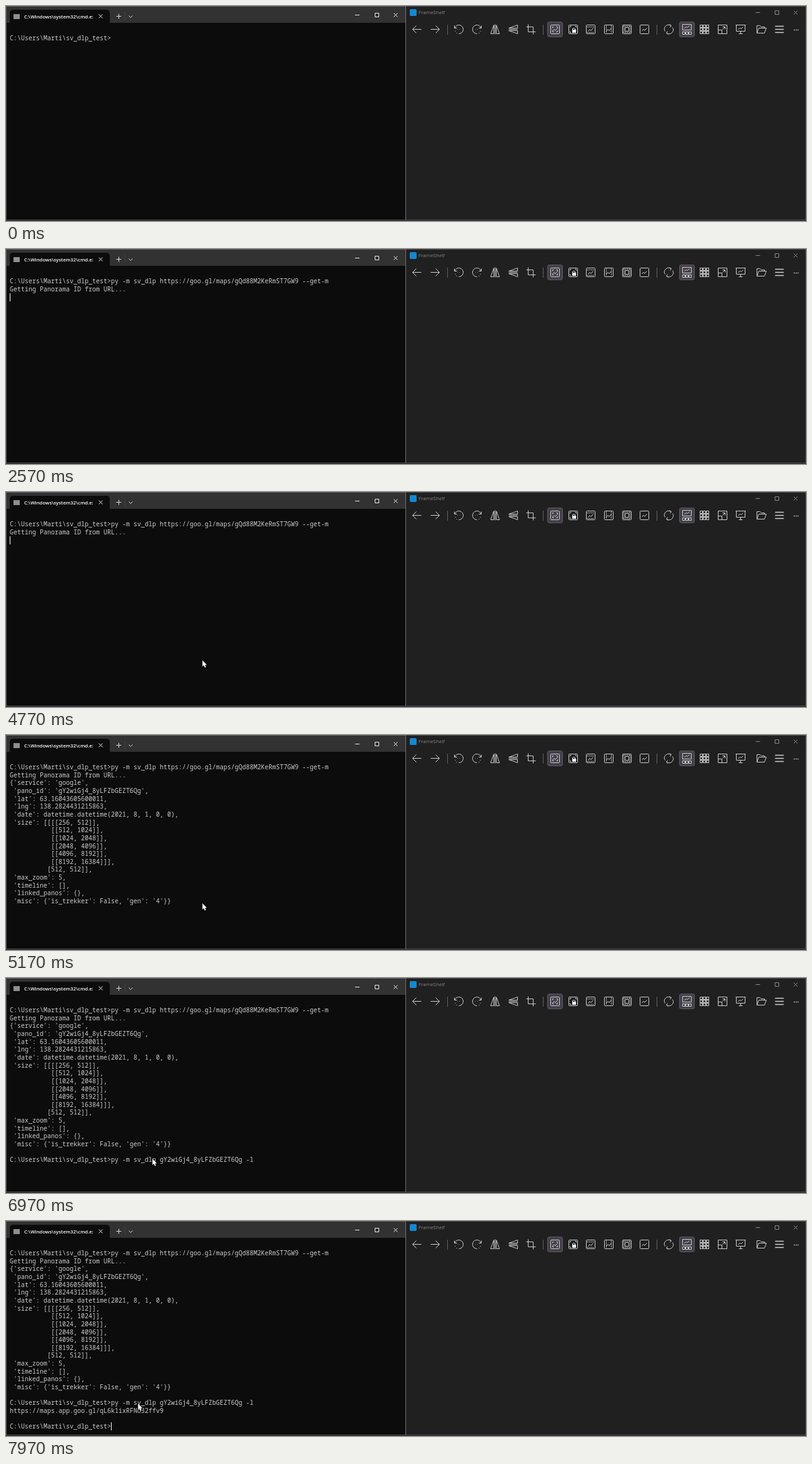
Write an HTML page with a canvas that moves like this. It is 1280 px wide and 345 px high and loops after 8000 ms.

```html
<!DOCTYPE html>
<html lang="en">
<head>
<meta charset="utf-8">
<title>Terminal and viewer</title>
<style>
html, body { margin: 0; width: 1280px; height: 345px; overflow: hidden; background: #0c0c0c; }
canvas { display: block; }
</style>
</head>
<body>
<canvas id="stage" width="1280" height="345"></canvas>
<script>
const LOOP = 8000;
const ctx = document.getElementById('stage').getContext('2d');
const UI = '"Open Sans", "Noto Sans", sans-serif';
const MONO = '500 10px "Noto Sans Mono", "DejaVu Sans Mono", monospace';

function rect(x, y, w, h, color) {
  ctx.fillStyle = color;
  ctx.fillRect(x, y, w, h);
}

function rounded(x, y, w, h, r, color) {
  ctx.fillStyle = color;
  ctx.beginPath();
  ctx.roundRect(x, y, w, h, r);
  ctx.fill();
}

function text(s, x, y, font, color) {
  ctx.font = font;
  ctx.fillStyle = color;
  ctx.fillText(s, x, y);
}

// Strokes a path given relative to the centre (x, y).
function icon(x, y, d, color = '#d8d8d8', width = 1) {
  ctx.save();
  ctx.translate(x + .5, y + .5);
  ctx.strokeStyle = color;
  ctx.lineWidth = width;
  ctx.lineJoin = 'round';
  ctx.stroke(new Path2D(d));
  ctx.restore();
}

const box = (x, y, w, h) => `M${x} ${y}h${w}v${h}h${-w}z`;
const CROSS = 'M-3 -3L3 3M3 -3L-3 3';
const MINUS = 'M-4 0H3';
const SQUARE = box(-3, -3, 6, 6);
const FRAME = 'M-6 -7H6Q7 -7 7 -6V6Q7 7 6 7H-6Q-7 7 -7 6V-6Q-7 -7 -6 -7z';
const CHART = 'M-4 3L-1.5 0L.5 2L4 -2';
const DASH_H = y => `M-6 ${y}h2m1 0h2m1 0h2m1 0h2`;
const DASH_V = x => `M${x} -6v2m0 1v2m0 1v2m0 1v2`;

const grid = rows => rows.map(y => [-7, -2, 3].map(x => box(x, y, 4, 4)).join('')).join('');

const tools = [
  [657, 'M7 0H-7M-1 -6L-7 0L-1 6'],
  [686, 'M-7 0H7M1 -6L7 0L1 6'],
  [724, 'M-7 -6V-2H-3M-6.5 -2.5A7 7 0 1 1 0 7M-2 0h.5M1 0h.5M-4 6h1M-6 3h1'],
  [753, 'M7 -6V-2H3M6.5 -2.5A7 7 0 1 0 0 7M1 0h.5M-2 0h.5M3 6h1M5 3h1'],
  [782, 'M-2 -7V7H-7zM2 -7V7H7zM0 -8V8'],
  [811, 'M7 -7V-2H-7zM-7 2H7V7zM-7 0H7'],
  [839, 'M-4 -8V4H8M-7 -4H4V8'],
  [878, FRAME + CHART + 'M-4 -2V-4H-2M2 -4H4V-2M-4 2V4H-2M2 4H4V2'],
  [907, FRAME + 'M-5 -3V-5H-3M3 -5H5V-3M-5 3V5H-3'],
  [935, FRAME + CHART + DASH_H(-4) + DASH_H(5)],
  [964, FRAME + CHART + DASH_V(-4) + DASH_V(4)],
  [993, FRAME + DASH_H(-5) + DASH_H(5) + DASH_V(-5) + DASH_V(5) + box(-3, -3, 6, 6)],
  [1021, FRAME + 'M-4 2L-1.5 0L.5 1.5L4 -2'],
  [1060, 'M-6 3A6.5 6.5 0 0 1 3 -6M6 -3A6.5 6.5 0 0 1 -3 6M1 -8L4 -6L2 -3M-1 8L-4 6L-2 3'],
  [1089, box(-7, -8, 14, 9) + 'M-4 -2L-1 -4L1 -3L4 -6' + grid([4])],
  [1117, grid([-7, -2, 3])],
  [1146, box(-7, -7, 14, 14) + 'M-7 1H-1V7M0 0L4 -4M0 -4H4V0'],
  [1175, 'M-8 -7H8M-7 -7V3H7V-7M0 3V7M-3 7H3M-4 0L-1 -2L1 -1L4 -4'],
  [1208, 'M-7 6V-6H-2L0 -4H5V-2M-7 6L-4 -2H8L5 6z'],
  [1237, 'M-7 -5H7M-7 0H7M-7 5H7', 1.3],
  [1264, 'M-4 1h1.5M-1 1h1.5M2 1h1.5', 1.3]
];

const controls = (xs, y, color) =>
  [MINUS, SQUARE, CROSS].forEach((d, i) => icon(xs[i], y, d, color));

function terminalWindow() {
  rect(0, 0, 640, 345, '#0c0c0c');
  rect(0, 0, 640, 27, '#323232');
  rounded(6, 6, 160, 22, [5, 5, 0, 0], '#0c0c0c');
  rect(12, 13, 10, 8, '#8f8f8f');
  ctx.save();
  ctx.beginPath();
  ctx.rect(28, 8, 111, 18);
  ctx.clip();
  text('C:\\Windows\\system32\\cmd.exe', 29, 20, '600 7.8px ' + UI, '#fff');
  ctx.restore();
  icon(151, 16, CROSS, '#eee');
  icon(180, 16, 'M-4 0H4M0 -4V4', '#ddd');
  rect(190, 9, 1, 14, '#404040');
  icon(199, 16, 'M-3 -1L0 2L3 -1', '#ddd');
  controls([562, 593, 623], 14, '#f0f0f0');
  rect(0, 0, 640, 1, '#666');
  rect(0, 0, 1, 344, '#555');
  rect(0, 343, 640, 1, '#666');
}

function viewerWindow() {
  rect(640, 0, 640, 345, '#202020');
  rect(640, 0, 640, 1, '#505050');
  rounded(646, 5, 11, 11, 2, '#1687d0');
  text('FrameShelf', 660, 13, '8px ' + UI, '#858585');
  controls([1203, 1233, 1263], 10, '#8c8c8c');
  for (const x of [866, 1077]) {
    rounded(x, 25, 25, 25, 4, '#5d5763');
    rounded(x + 1, 26, 23, 23, 3, '#454049');
  }
  for (const x of [706, 859, 1041]) rect(x, 30, 1, 16, '#626262');
  for (const [x, d, width] of tools) icon(x, 37, d, '#d0d0d0', width);
  rect(906, 38, 6, 5, '#eee');
  icon(908, 37, 'M-2 1V-1Q0 -3 2 -1V1', '#eee');
  rect(639, 0, 1, 344, '#737373');
  rect(640, 343, 640, 1, '#55535c');
  rect(1279, 0, 1, 344, '#484848');
}

const PROMPT = 'C:\\Users\\Marti\\sv_dlp_test>';
const FIRST = 'py -m sv_dlp https://goo.gl/maps/gQd88M2KeRmST7GW9 --get-m';
const SECOND = 'py -m sv_dlp gY2wiGj4_8yLFZbGEZT6Qg -l';
const OUTPUT = `{'service': 'google',
 'pano_id': 'gY2wiGj4_8yLFZbGEZT6Qg',
 'lat': 63.16043605600011,
 'lng': 138.2824431215863,
 'date': datetime.datetime(2021, 8, 1, 0, 0),
 'size': [[[[256, 512]],
           [[512, 1024]],
           [[1024, 2048]],
           [[2048, 4096]],
           [[4096, 8192]],
           [[8192, 16384]]],
          [512, 512]],
 'max_zoom': 5,
 'timeline': [],
 'linked_panos': {},
 'misc': {'is_trekker': False, 'gen': '4'}}`.split('\n');

// Text by [time, row, string].
const prints = [
  [0, 0, PROMPT],
  [720, 0, PROMPT + FIRST],
  [2570, 1, 'Getting Panorama ID from URL...'],
  ...OUTPUT.map((s, i) => [5170, i + 2, s]),
  [5230, 19, PROMPT],
  [5570, 19, PROMPT + SECOND],
  [7430, 20, 'https://maps.app.goo.gl/qL6k1ixRFNo32ffv9'],
  [7430, 22, PROMPT]
];

// Caret by [time, row, column]; no row means hidden.
const carets = [
  [0], [720, 0, 85], [1230, 1, 0], [1970], [2570, 2, 0], [5170],
  [5230, 19, 27], [5570, 19, 65], [5830], [5970, 20, 0], [6630],
  [7170, 20, 0], [7430, 22, 27]
];

// Pointer by [start, end, steps, x0, y0, x1, y1]; a lone time hides it.
const moves = [
  [0],
  [500, 830, 4, 330, 338, 314, 262],
  [1230, 1500, 5, 312, 266, 266, 317],
  [2300],
  [3700, 4170, 8, 328, 340, 314, 271],
  [4630, 4630, 1, 314, 270, 314, 270],
  [6030],
  [6630, 6970, 6, 803, 333, 234, 290],
  [7030, 7230, 3, 232, 290, 226, 291],
  [7430, 7830, 7, 224, 292, 213, 292],
  [7970, 7970, 1, 211, 293, 211, 293]
];

const latest = (list, t) => list.findLast(e => e[0] <= t);
const rowTop = row => 45.3 + row * 12.64;

function pointer(t) {
  const [start, end, steps, x0, y0, x1, y1] = latest(moves, t);
  if (!steps) return;
  const n = steps - 1;
  const k = n ? Math.min(n, Math.floor((t - start) / (end - start) * n + .01)) / n : 1;
  const e = k * (2 - k);
  ctx.save();
  ctx.translate(Math.round(x0 + (x1 - x0) * e), Math.round(y0 + (y1 - y0) * e));
  const arrow = new Path2D('M.3 0V10L2.6 8L4.2 11.7L5.9 11L4.4 7.4H7.4Z');
  ctx.strokeStyle = '#000';
  ctx.lineWidth = 1;
  ctx.stroke(arrow);
  ctx.fillStyle = '#fff';
  ctx.fill(arrow);
  ctx.restore();
}

function draw(t) {
  terminalWindow();
  viewerWindow();
  const rows = [];
  for (const [time, row, s] of prints) if (time <= t) rows[row] = s;
  rows.forEach((s, row) => text(s, 6, Math.round(rowTop(row) + 9.8), MONO, '#ccc'));
  const [, row, column] = latest(carets, t);
  if (row !== undefined) rect(6 + column * 6, Math.round(rowTop(row)), 1, 13, '#fff');
  pointer(t);
}

const begin = performance.now();
function tick() {
  draw((performance.now() - begin) % LOOP);
  requestAnimationFrame(tick);
}
tick();
</script>
</body>
</html>
```
